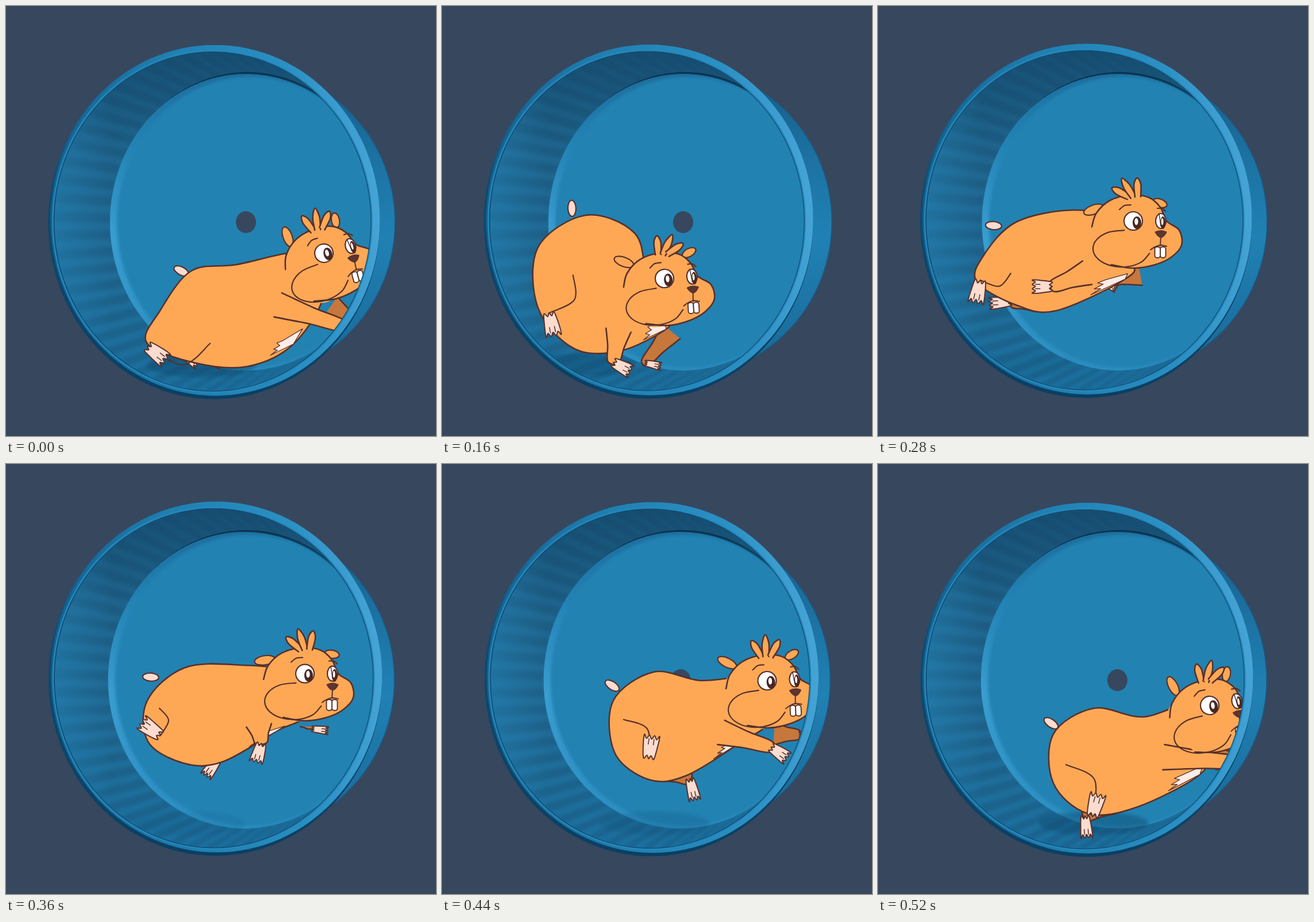
An HTML page for the animation above (0.56 s loop, 748 px wide and 748 px high).

```html
<!DOCTYPE html>
<html lang="en">
<head>
<meta charset="utf-8">
<title>Hamster wheel</title>
<style>
html, body { margin: 0; width: 100%; height: 100%; overflow: hidden; background: #37475e; }
svg { display: block; width: 100vw; height: 100vh; }
</style>
</head>
<body>
<svg viewBox="0 0 748 748" fill="none" stroke-linecap="round" stroke-linejoin="round">
  <defs>
    <linearGradient id="edge" x1="0" y1="0" x2="0" y2="1">
      <stop offset="0" stop-color="#1c79ab"/><stop offset=".4" stop-color="#0e4a70"/><stop offset="1" stop-color="#0a3f62"/>
    </linearGradient>
    <linearGradient id="rim" x1="0" y1=".4" x2="1" y2=".3">
      <stop offset="0" stop-color="#14608e"/><stop offset=".4" stop-color="#1f80b2"/>
      <stop offset=".75" stop-color="#2b90c4"/><stop offset="1" stop-color="#48a5d7"/>
    </linearGradient>
    <linearGradient id="drum" x1="0" y1="0" x2="0" y2="1">
      <stop offset="0" stop-color="#155a84"/><stop offset=".25" stop-color="#1b6f9f"/>
      <stop offset=".55" stop-color="#2181b4"/><stop offset="1" stop-color="#176796"/>
    </linearGradient>
    <linearGradient id="wall" x1="0" y1="0" x2="0" y2="1">
      <stop offset="0" stop-color="#174f73"/><stop offset=".3" stop-color="#1f658e"/>
      <stop offset=".65" stop-color="#206b96"/><stop offset="1" stop-color="#1c709f"/>
    </linearGradient>
    <linearGradient id="side" x1="0" y1="0" x2="1" y2="0">
      <stop offset="0" stop-color="#2589bd" stop-opacity=".45"/><stop offset=".18" stop-color="#2589bd" stop-opacity="0"/>
    </linearGradient>
    <linearGradient id="ring" x1="0" y1="0" x2="0" y2="1">
      <stop offset="0" stop-color="#1c6d9c"/><stop offset=".25" stop-color="#2484b6"/>
      <stop offset=".55" stop-color="#3a9dd0"/><stop offset="1" stop-color="#2a8cbf"/>
    </linearGradient>
    <filter id="soft" x="-20%" y="-20%" width="140%" height="140%"><feGaussianBlur stdDeviation="2.5"/></filter>
    <clipPath id="open"><ellipse id="hole"/></clipPath>
  </defs>
  <rect width="748" height="748" fill="#37475e"/>
  <g id="stage"></g>
</svg>
<script>
const LINE = '#57302a', FUR = '#fea856', DARK = '#c6773c', SKIN = '#fbdccf';
const STEP = 40, LOOP = 560, PEAK = 400;

// Key poses. head: near eye x, y, tilt, ear lift, tuft lean. Paws and tail: x, y, angle.
// body: back, rump top, rear, heel, belly, ribs, chest.
const key = (t, head, body, tail, knee, foot, footFar, hand, handFar) =>
  ({ t, head, body, tail, knee, foot, footFar, hand, handFar });
const keys = [
  key(0, [553, 430, -15, 85, 8], [400,450, 322,461, 268,530, 245,586, 330,621, 420,627, 500,588],
    [305,461,28], [355,587], [246,592,38], [304,600,37], [590,558,10], [620,560,30]),
  key(80, [475, 458, -3, 40, 24], [355,441, 280,423, 210,475, 205,570, 280,622, 370,627, 480,558],
    [247,419,82], [265,517], [213,568,60], [255,580,45], [400,645,-3], [518,602,5]),
  key(160, [387, 474, -4, 25, 30], [335,395, 250,364, 167,420, 167,525, 230,596, 310,600, 390,562],
    [226,352,88], [228,468], [186,534,78], [235,560,60], [298,620,28], [353,621,12]),
  key(280, [444, 374, 0, -20, -32], [340,355, 240,376, 183,435, 172,480, 240,520, 310,530, 430,475],
    [201,382,5], [231,465], [178,477,102], [232,514,175], [303,488,180], [390,478,30]),
  key(400, [558, 360, 0, -3, -12], [440,347, 345,344, 277,400, 285,485, 345,521, 410,512, 490,460],
    [277,365,3], [285,405], [314,470,272], [438,510,100], [515,485,70], [603,452,-5]),
  key(480, [573, 394, -6, 62, 15], [455,406, 390,380, 318,425, 316,520, 375,577, 440,572, 550,508],
    [315,406,65], [347,484], [405,555,285], [424,585,53], [630,500,0], [640,490,0]),
  key(520, [577, 420, -9, 72, 24], [460,440, 375,425, 305,470, 305,555, 365,608, 450,597, 560,540],
    [301,451,35], [327,523], [373,613,285], [360,612,85], [640,520,0], [640,515,0])
];

const r1 = v => Math.round(v * 10) / 10;
const mix = (a, b, k) => a + (b - a) * k;
const mid = (p, q, k = .5) => [mix(p[0], q[0], k), mix(p[1], q[1], k)];
const pairs = a => a.flatMap((v, i) => i % 2 ? [] : [[v, a[i + 1]]]);
const polar = (x, y, rx, ry, deg) => [x + rx * Math.cos(deg * Math.PI / 180), y + ry * Math.sin(deg * Math.PI / 180)];
const arc = (x, y, rx, ry, from, to, n = 8) =>
  Array.from({ length: n + 1 }, (_, i) => polar(x, y, rx, ry, mix(from, to, i / n)));

function poseAt(t) {
  const i = keys.findLastIndex(k => k.t <= t);
  const a = keys[i], b = keys[(i + 1) % keys.length], k = (t - a.t) / ((b.t || LOOP) - a.t);
  const out = {};
  for (const name in a) if (name !== 't') out[name] = a[name].map((v, j) => mix(v, b[name][j], k));
  return out;
}

// Smooth curve through points
function curve(pts, closed) {
  const n = pts.length;
  const at = i => closed ? pts[(i + n) % n] : pts[Math.max(0, Math.min(n - 1, i))];
  let d = 'M' + pts[0].map(r1);
  for (let i = 0; i < (closed ? n : n - 1); i++) {
    const [p, q, r, s] = [at(i - 1), at(i), at(i + 1), at(i + 2)];
    d += 'C' + [0, 1].map(k => r1(q[k] + (r[k] - p[k]) / 6)) + ' ' +
      [0, 1].map(k => r1(r[k] - (s[k] - q[k]) / 6)) + ' ' + r.map(r1);
  }
  return d + (closed ? 'Z' : '');
}

const path = (d, fill = 'none', stroke = LINE, w = 2.6) =>
  `<path d="${d}" fill="${fill}" stroke="${stroke}" stroke-width="${w}"/>`;
const line = (pts, w = 2.2) => path(curve(pts), 'none', LINE, w);
const oval = (x, y, rx, ry, fill, stroke = 'none', w = 2.2, more = '') =>
  `<ellipse cx="${r1(x)}" cy="${r1(y)}" rx="${r1(rx)}" ry="${r1(ry)}" fill="${fill}" stroke="${stroke}" stroke-width="${w}" ${more}/>`;
const leaf = (x, y, len, wid, deg, fill) =>
  oval(x, y, len, wid, fill, LINE, 2.2, `transform="rotate(${r1(deg)} ${r1(x)} ${r1(y)})"`);

// Ankle at x, y; toes are bumps along the far end
function paw([x, y, deg], len, wid) {
  const c = Math.cos(deg * Math.PI / 180), s = Math.sin(deg * Math.PI / 180);
  const put = (u, v) => [x + u * len * c - v * wid * s, y + u * len * s + v * wid * c];
  const pts = [put(0, -.32), put(.55, -.46)];
  for (let i = 0; i < 7; i++) pts.push(put(i % 2 ? .86 : 1.02, (i - 3) * .16));
  pts.push(put(.55, .44), put(0, .32), put(.14, .12), put(0, 0), put(.14, -.14));
  return path(curve(pts, true), SKIN, LINE, 2) +
    [-.16, .16].map(v => line([put(.86, v), put(.62, v)], 1.5)).join('');
}

function limb(a, b, wa, wb, fill) {
  const dx = b[0] - a[0], dy = b[1] - a[1], l = Math.hypot(dx, dy) || 1;
  const off = (p, w) => [p[0] + dy / l * w / 2, p[1] - dx / l * w / 2];
  const m = mid(a, b), wm = mix(wa, wb, .6);
  return path(curve([off(a, wa), off(m, wm), off(b, wb), off(b, -wb), off(m, -wm), off(a, -wa)]), fill);
}

function chest(body, under, eye) {
  const breast = body[6], tip = mid(body[5], breast), l = Math.hypot(eye[0] - tip[0], eye[1] - tip[1]);
  const inner = mid(tip, eye, 30 / l), pts = [mid(breast, under, .3), breast, tip];
  for (let i = 1; i < 6; i++) {
    const p = mid(tip, inner, i / 5);
    pts.push(i % 2 ? mid(p, breast, .25) : p);
  }
  return path('M' + pts.map(p => p.map(r1)).join('L') + 'Z', '#fdebe6', LINE, 1.3);
}

// Head, drawn around the near eye
const SKULL = pairs([-72,10, -64,-14, -40,-36, -5,-45, 27,-41, 47,-24, 58,0, 80,16, 84,42, 66,63, 38,76, 0,82, -38,76]);
const eye = (x, rx, ry, prx) => oval(x, 0, rx, ry, '#fff', LINE) +
  oval(x + rx * .4, 3, prx, 11, '#4a2723') + oval(x + rx * .4 - 1, 1, prx * .42, 6, '#fff');

function tuft(lean) {
  return [-1, 0, 1].map(i => {
    const deg = lean + i * 30 - 90, x = i * 8, y = -42;
    const side = s => polar(...polar(x, y, 22, 22, deg), 6, 6, deg + s * 90);
    const root = s => polar(x, y, 5, 5, deg + s * 90);
    return path(curve([root(-1), side(-1), polar(x, y, 38 - 5 * Math.abs(i), 38 - 5 * Math.abs(i), deg), side(1), root(1)]), FUR);
  }).join('');
}

function headAt([x, y, tilt, lift, lean]) {
  const tooth = dx => `<rect x="${47 + dx}" y="45" width="9.5" height="19" rx="4" fill="#fff" stroke="${LINE}" stroke-width="1.9"/>`;
  return `<g transform="translate(${r1(x)} ${r1(y)}) rotate(${r1(tilt)})">` +
    leaf(...polar(33, -36, 14, 14, -lift), 13, 7, -lift, FUR) +
    leaf(...polar(-52, -26, 18, 18, 180 + lift), 18, 8, lift, FUR) +
    path(curve(SKULL, true), FUR, 'none') + line(SKULL, 2.6) + tuft(lean) +
    line(arc(-20, 48, 50, 32, 275, 15)) +
    eye(48, 9, 13, 4.5) + eye(0, 16, 16, 7.5) +
    line([[-24, -20], [-15, -27], [-4, -28]]) + line([[42, -22], [50, -22], [56, -17]]) +
    line([[45, -13], [48, 9]], 1.5) +
    tooth(-9.5) + tooth(0) +
    line([[48, 26], [47, 43]], 2) + line([[30, 50], [38, 45], [47, 42], [58, 44]], 2) +
    path('M38 19Q48 14 58 19Q54 28 48 29Q42 27 38 19', '#5c352f', LINE, 1.2) + '</g>';
}

// Blurred fan of hind paws at the height of the kick
function fan() {
  const sweep = arc(322, 478, 52, 48, 212, 345);
  const tips = arc(322, 478, 66, 62, 222, 342, 9);
  return path(curve(sweep), 'none', LINE, 38) + path(curve(sweep), 'none', SKIN, 34) +
    tips.map((p, i) => (i % 2 ? '' : line([p, mid(p, [322, 478], .35), mid(p, [330, 470], .5)])) + oval(...p, 4.5, 6, SKIN, LINE, 2)).join('');
}

function hamster(p, peak) {
  const [x, y] = p.head, body = pairs(p.body), under = [x, y + 70];
  const shoulder = [x - 80, y + 90], hip = mid(body[4], body[5]);
  const { knee, foot, hand } = p;
  const dx = foot[0] - knee[0], dy = foot[1] - knee[1];
  const thigh = [mix(knee[0], foot[0], .45) + dy * .32, mix(knee[1], foot[1], .45) - dx * .32];
  const blurHands = peak ? [-1, 1].map(i => paw([hand[0] + 32 * i, hand[1] - 8 * (i + 1), hand[2] - 16 * i], 34, 24)).join('') : '';
  return limb([x + 12, y + 92], p.handFar, 40, 15, DARK) + paw(p.handFar, 28, 14) +
    limb([hip[0], hip[1] - 12], p.footFar, 38, 20, DARK) + paw(p.footFar, 38, 21) +
    leaf(p.tail[0], p.tail[1], 14, 7, p.tail[2], SKIN) +
    path(curve([[x - 30, y], ...body, under], true), FUR) +
    chest(body, under, [x, y]) +
    line([knee, thigh, foot]) + (peak ? fan() : paw(foot, 40, 28)) + blurHands +
    limb(shoulder, hand, 44, 19, FUR) + paw(hand, 34, 24) + headAt(p.head);
}

function ridges(fx, frx, fy, bx, brx) {
  const count = 56, turn = 360 / count;
  let d = '';
  for (let i = 0; i < count; i++) {
    const a = i * turn, b = a + turn / 2;
    d += 'M' + [polar(fx, fy, frx, 295, a), polar(bx, 376, brx, 258, a),
      polar(bx, 376, brx, 258, b), polar(fx, fy, frx, 295, b)].map(q => q.map(r1)).join('L') + 'Z';
  }
  return `<path d="${d}" fill="#123f5f" opacity=".24" filter="url(#soft)"/>`;
}

const stage = document.getElementById('stage'), hole = document.getElementById('hole');
const wave = (t, top) => Math.cos((t - top) / LOOP * 2 * Math.PI);

function draw(t) {
  const p = poseAt(t), w = 1.4 * wave(t, 140) - .4, dy = -1.2 - 1.3 * wave(t, 330);
  const fx = 358.5 - 2 * w, frx = 275 - 1.5 * w, fy = 375 + dy;
  const bx = 418 + 2 * w, brx = 236 - w;
  const belly = p.body[9], ground = Math.max(0, Math.min(1, (belly - 500) / 110));
  Object.entries({ cx: fx, cy: fy, rx: frx, ry: 295 }).forEach(([k, v]) => hole.setAttribute(k, v));
  stage.innerHTML =
    oval(418 + w, 376 + dy * .3, 259, 267, 'url(#drum)', '#175f8b', 1.5) +
    oval(fx + 2.5, fy + 1, frx + 13, 308, 'url(#edge)') +
    oval(fx + 4.5, fy - 2, frx + 11, 305, 'url(#rim)') +
    oval(fx - .5, fy, frx + 2, 297, 'none', '#2588bb', 2.4) +
    oval(fx, fy, frx, 295, 'url(#wall)') +
    '<g clip-path="url(#open)">' +
      ridges(fx, frx, fy, bx, brx) +
      oval(fx, fy, frx, 295, 'url(#side)') +
      oval(bx + 3, 373, brx, 258, '#0b324d') +
      oval(bx, 376, brx, 258, 'url(#ring)') +
      oval(bx + 9, 376, brx - 3, 253, '#2082b2', 'none', 0, 'filter="url(#soft)"') +
      oval(418 + 1.6 * w, 376, 17.5, 19, '#37475e') +
      oval(p.body[8] + 10, 625, 95, 20, '#0c4468', 'none', 0, `opacity="${r1(ground * 4) / 10}" filter="url(#soft)"`) +
      hamster(p, t === PEAK) +
    '</g>' +
    oval(fx, fy, frx, 295, 'none', '#0e4a71', 1.2);
}

let last = -1;
function tick(now) {
  const t = Math.floor(now % LOOP / STEP) * STEP;
  if (t !== last) draw(last = t);
  requestAnimationFrame(tick);
}
draw(0);
requestAnimationFrame(tick);
</script>
</body>
</html>
```
